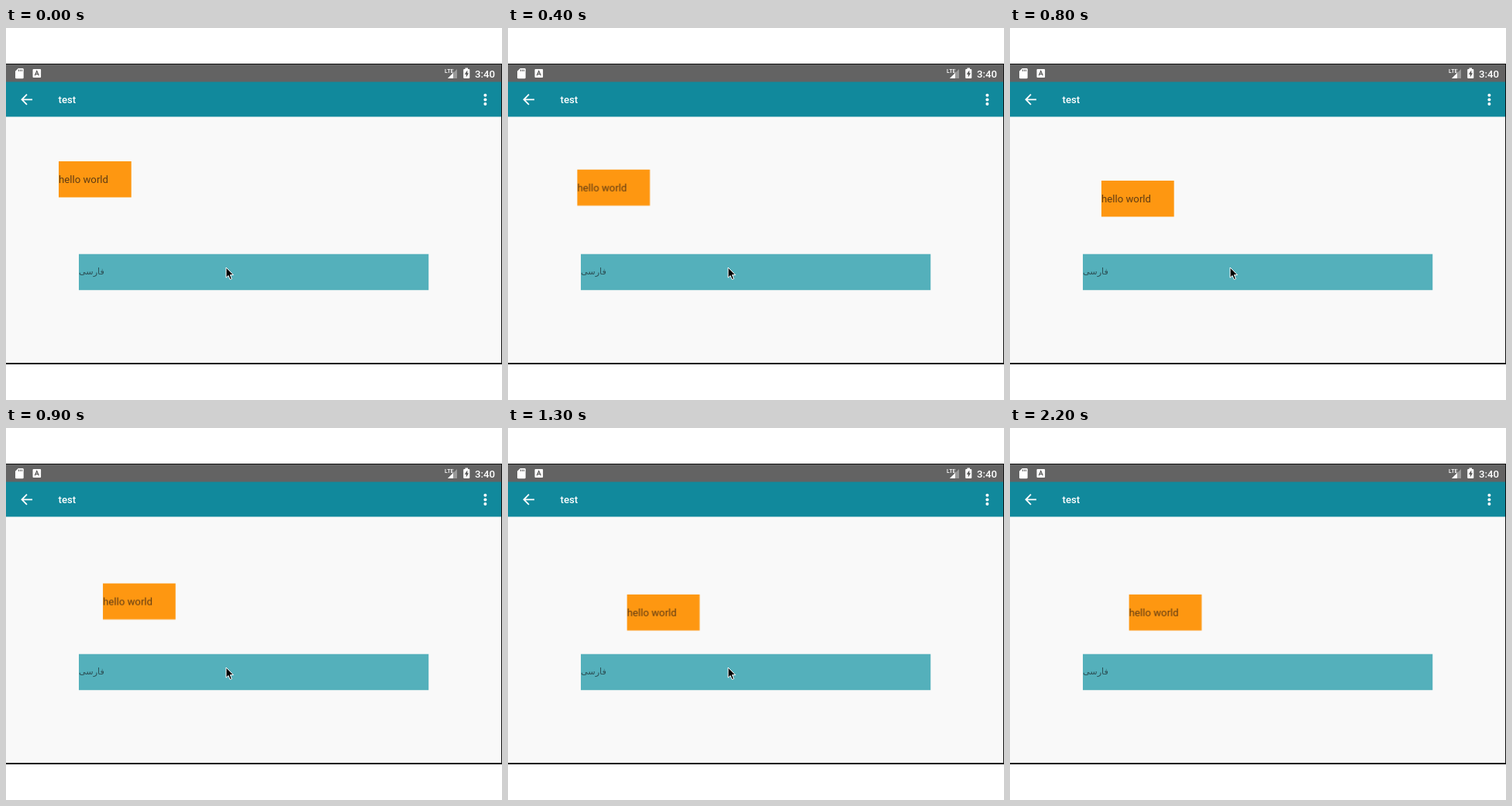
Animation of 640 by 480 pixels, one loop 2.4 s. Source, as an HTML page:

```html
<!DOCTYPE html>
<html lang="en">
<head>
<meta charset="utf-8">
<title>test</title>
<style>
  html, body { margin: 0; width: 100%; height: 100%; overflow: hidden; background: #fff; }
  svg { display: block; width: 640px; height: 480px; }
  text { font: 13.2px Roboto, sans-serif; }
  .bold { font-weight: 500; fill: #fff; }
  .box { animation: slide 2400ms linear infinite; }
  .cursor { animation: point 2400ms step-end infinite; }

  /* twelve equal jumps between 100 ms and 1300 ms */
  @keyframes slide {
    0% { transform: translate(68px, 172px); }
    4.1666% { transform: translate(68px, 172px); animation-timing-function: steps(12, end); }
    54.1666%, 100% { transform: translate(153.6px, 214.8px); }
  }
  @keyframes point {
    0% { transform: translate(284px, 309px); }
    58.333% { transform: translate(289px, 338px); }
    62.499% { transform: translate(298px, 384px); }
    66.666% { transform: translate(303px, 404px); opacity: 1; }
    74.999%, 100% { transform: translate(303px, 404px); opacity: 0; }
  }
</style>
</head>
<body>
<svg viewBox="0 0 640 480">
  <!-- screen -->
  <rect y="46" width="640" height="388" fill="#111"/>
  <rect y="47" width="639" height="385" fill="#f9f9f9"/>
  <rect y="47" width="639" height="23" fill="#636363"/>
  <rect y="69.5" width="639" height="45" fill="#11899c"/>

  <!-- status bar -->
  <g fill="#fff">
    <path d="M15.8 52H21.5Q22.7 52 22.7 53.2V64Q22.7 65.2 21.5 65.2H13.2Q12 65.2 12 64V55.8Z"/>
    <rect x="34.5" y="53" width="10.6" height="11" rx="1"/>
    <text x="566" y="58" style="font-size:7.2px;font-weight:500" textLength="auto">LTE</text>
    <path d="M582 53V65H570Z" fill="#999"/>
    <path d="M577 58V65H570Z"/>
    <path d="M592.5 51.5H596V53H597.2Q598.3 53 598.3 54V64Q598.3 65 597.2 65H591.2Q590.2 65 590.2 64V54Q590.2 53 591.2 53H592.5Z"/>
  </g>
  <path d="M16.5 53.5V56M18.5 53.5V56M20.5 53.5V56" stroke="#636363"/>
  <path d="M37.3 61.3L39.8 55.5L42.3 61.3M38.3 59.5H41.3" fill="none" stroke="#555" stroke-width="1.2"/>
  <path d="M595.3 54.5L591.8 59.8H593.8V63.5L597 58.3H595.3Z" fill="#555"/>
  <text class="bold" x="605" y="63.5">3:40</text>

  <!-- toolbar -->
  <path d="M34 92.3H21M27 85.7L20.5 92.3L27 98.9" fill="none" stroke="#fff" stroke-width="1.8"/>
  <text class="bold" x="67.6" y="97">test</text>
  <g fill="#fff">
    <circle cx="618.4" cy="86.7" r="2"/>
    <circle cx="618.4" cy="92.4" r="2"/>
    <circle cx="618.4" cy="98.1" r="2"/>
  </g>

  <!-- views -->
  <g class="box">
    <rect width="93.7" height="46.5" fill="#fe9711"/>
    <text x="0" y="28.3" fill="#5e3b14">hello world</text>
  </g>
  <rect x="94" y="291.7" width="451.3" height="46.5" fill="#54b0bb"/>
  <text x="94" y="318" fill="#2c5056" style="font:11.2px 'DejaVu Sans', sans-serif">فارسی</text>

  <path class="cursor" d="M0 0V13.2L3 10.5L5.1 15.5L7.4 14.5L5.3 9.6H9.4Z" fill="#000" stroke="#fff" stroke-width="1" stroke-linejoin="round"/>
</svg>
</body>
</html>
```
